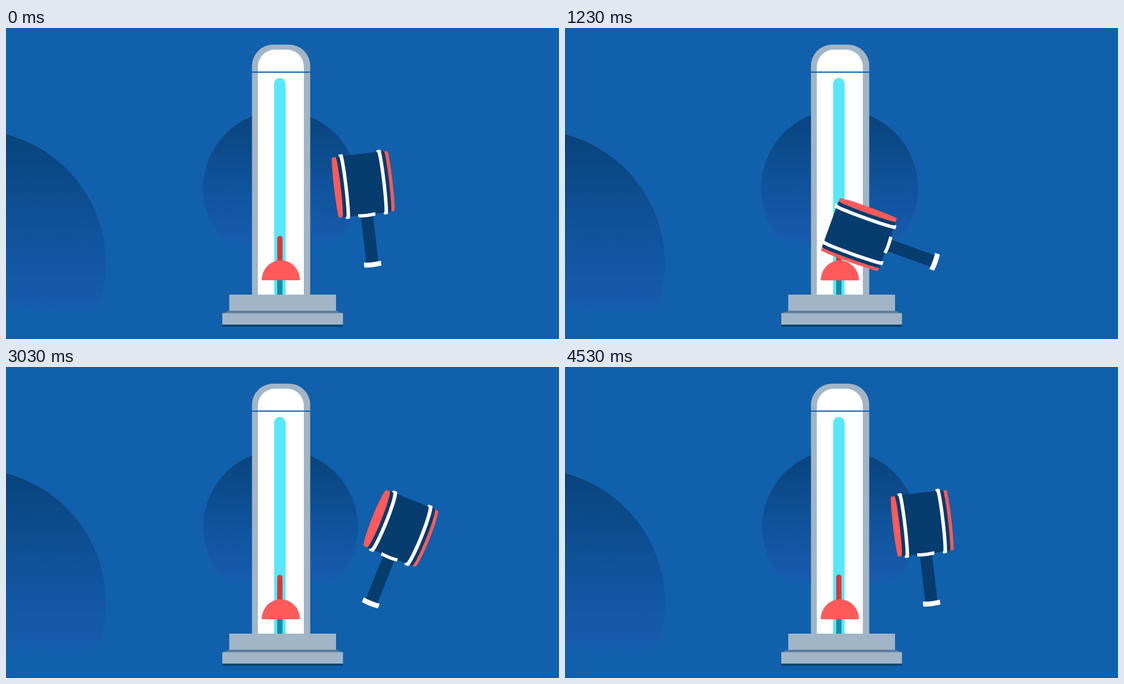
Animation of 997 by 561 pixels, one loop 4560 ms. Source, as an HTML page with a canvas:

```html
<!DOCTYPE html>
<html lang="en">
<head>
<meta charset="utf-8">
<title>High striker</title>
<style>
  html, body { margin: 0; width: 100%; height: 100%; overflow: hidden; background: #1160ac; }
  canvas { display: block; width: 100vw; height: 100vh; }
</style>
</head>
<body>
<canvas id="stage" width="997" height="561"></canvas>
<script>
const ctx = document.getElementById('stage').getContext('2d');
const PERIOD = 2280;
const TAU = Math.PI * 2;
const BG = '#1160ac', NAVY = '#063c6e', RED = '#ff5a5a', GREY = '#a2b5c6', CYAN = '#55e8ff';

const sine = u => 0.5 - 0.5 * Math.cos(Math.PI * u);
const swing = u => Math.pow(u, 2.3);
const clamp = u => Math.min(1, Math.max(0, u));

// Keys are [time, value, easing into this key].
function track(keys, t) {
  if (t <= keys[0][0]) return keys[0][1];
  for (let i = 1; i < keys.length; i++) {
    const [t0, v0] = keys[i - 1];
    const [t1, v1, ease = sine] = keys[i];
    if (t < t1) return v0 + (v1 - v0) * ease((t - t0) / (t1 - t0));
  }
  return keys[keys.length - 1][1];
}

const TILT = [[0, -6.7], [385, -4.8], [880, 27], [960, 27], [1225, -70, swing],
              [1280, -77], [1300, -77], [1640, -6.7]];
const SPIN = [[0, 0.055], [505, TAU + 0.08], [750, TAU + 0.1], [960, TAU + 0.1],
              [1225, TAU - 0.05], [1640, TAU + 0.055]];
const PULSE = [[1200, 139.5], [1371, 168], [1709, 139.5]];
const PRESS = [[1225, 0], [1280, 16], [1380, 0]];
const BAR = [[1215, 375], [1695, 105], [1735, 105], [2265, 375]];

// Mallet head along its axis: [from, to, radius, colour].
const HEAD = [
  [-50, -44, 54.5, RED], [-44, -37.5, 55, NAVY], [-37.5, -31.5, 58.5, '#fff'],
  [-31.5, 31.5, 55, NAVY],
  [31.5, 37.5, 58.5, '#fff'], [37.5, 44, 55, NAVY], [44, 50, 54.5, RED]
];

// Trails: [centre y, height, head start, tail start, duration].
const TRAILS = [
  [292, 39, 20, 80, 280], [324.5, 31.6, 10, 32, 280],
  [292, 39, 250, 310, 430], [324.5, 31.6, 175, 310, 430]
];

function box(x, y, w, h, color, radii = 0) {
  ctx.fillStyle = color;
  ctx.beginPath();
  ctx.roundRect(x, y, w, h, radii);
  ctx.fill();
}

function oval(x, y, rx, ry, color) {
  ctx.fillStyle = color;
  ctx.beginPath();
  ctx.ellipse(x, y, rx, ry, 0, 0, TAU);
  ctx.fill();
}

function shadedDisc(x, y, r, fade) {
  const g = ctx.createLinearGradient(0, y - r, 0, y - r + 2 * r * fade);
  g.addColorStop(0, '#08437b');
  g.addColorStop(0.55, '#0f539b');
  g.addColorStop(0.92, '#165bab');
  g.addColorStop(1, BG);
  oval(x, y, r, r, g);
}

function tower() {
  box(443.5, 30, 105, 452, GREY, [38, 38, 0, 0]);
  box(454, 39, 83, 443, '#fff', [31, 31, 0, 0]);
  box(443, 78.5, 106, 2.3, BG);
  box(483.5, 90, 20.5, 392, CYAN, [10.2, 10.2, 0, 0]);
}

function base() {
  box(402.5, 481, 192.5, 29.5, GREY);
  ctx.fillStyle = '#5d7d9e';
  ctx.beginPath();
  ctx.moveTo(402.5, 510);
  ctx.lineTo(595, 510);
  ctx.lineTo(607.5, 515);
  ctx.lineTo(390, 515);
  ctx.fill();
  box(390, 514.5, 217.5, 20.5, GREY);
  box(390, 535, 217.5, 4, '#06456d');
}

function striker(t) {
  const press = track(PRESS, t), top = track(BAR, t);
  const y = 455 + press;
  box(489, 455, 9.5, 26, '#198c9f');
  box(489, top, 9.5, y - top, '#e03436', [4.7, 4.7, 0, 0]);
  ctx.fillStyle = RED;
  ctx.beginPath();
  ctx.ellipse(495.5, y, 34.5, 36, 0, Math.PI, TAU);
  ctx.fill();
}

// A white band bowed like a rim seen slightly from above.
function band(y, h, bow) {
  ctx.fillStyle = '#fff';
  ctx.beginPath();
  ctx.moveTo(-15.5, y);
  ctx.quadraticCurveTo(0, y + bow, 15.5, y);
  ctx.lineTo(15.5, y + h);
  ctx.quadraticCurveTo(0, y + h + bow, -15.5, y + h);
  ctx.fill();
}

function handle() {
  box(-11, -82, 22, 86, NAVY);
  band(2, 9, 2);
  band(-86, 6, 2);
}

function mallet(t) {
  const spin = track(SPIN, t);
  const c = Math.cos(spin), s = Math.sin(spin);
  const parts = s >= 0 ? HEAD : [...HEAD].reverse();
  ctx.save();
  ctx.translate(660.2, 419.5);
  ctx.rotate(track(TILT, t) * Math.PI / 180);
  parts.forEach(([a, b, r, color], i) => {
    const xa = -a * c, xb = -b * c, rx = r * Math.abs(s);
    oval(xa, -138.5, rx, r, color);
    oval(xb, -138.5, rx, r, color);
    box(Math.min(xa, xb), -138.5 - r, Math.abs(xb - xa), 2 * r, color);
    if (i === 3) handle();
  });
  ctx.restore();
}

function trails(t) {
  ctx.strokeStyle = '#fff';
  ctx.lineWidth = 2;
  for (const [y, ry, head, tail, span] of TRAILS) {
    const from = clamp((t - tail) / span), to = clamp((t - head) / span);
    if (to <= from) continue;
    ctx.beginPath();
    ctx.ellipse(643, y, 106, ry, 0, Math.PI * (1 - from), Math.PI * (1 - to), true);
    ctx.stroke();
  }
}

function draw(now) {
  const t = now % PERIOD;
  ctx.fillStyle = BG;
  ctx.fillRect(0, 0, 997, 561);
  shadedDisc(-61, 425, 241, 0.69);
  shadedDisc(495, 289, track(PULSE, t), 0.87);
  tower();
  striker(t);
  base();
  mallet(t);
  trails(t);
}

let start;
function tick(now) {
  start ??= now;
  draw(now - start);
  requestAnimationFrame(tick);
}
draw(0);
requestAnimationFrame(tick);
</script>
</body>
</html>
```
